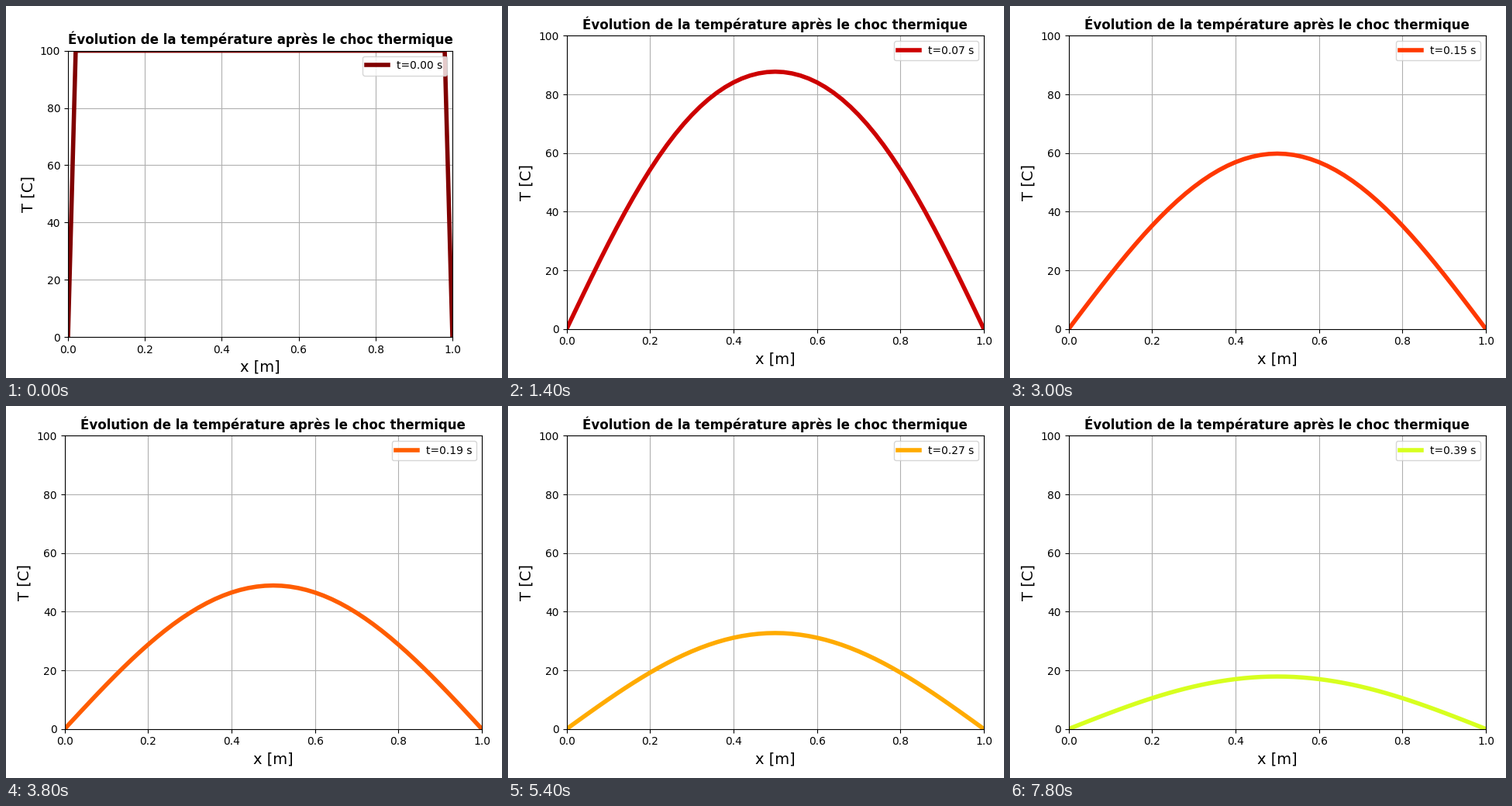
Animation of 640x480 px, one loop 8 s. Source, as a matplotlib script:

```python
import numpy as np
import matplotlib.pyplot as plt
from matplotlib.animation import FuncAnimation

FRAMES, INTERVAL = 40, 200
DT = 0.01            # simulated seconds per frame
DIFFUSIVITY = 0.51
T_START = 100.0
HEIGHT = 480         # stage height in pixels
TOP_GAP = 38.33      # pixels above the axes in the tight layout

x = np.linspace(0, 1, 51)
modes = np.arange(1, 100, 2)[:, None]


def temperature(t):
    """Heat equation on a rod whose two ends are held at zero."""
    if t == 0:
        temp = np.full_like(x, T_START)
    else:
        decay = np.exp(-DIFFUSIVITY * (modes * np.pi) ** 2 * t)
        waves = np.sin(modes * np.pi * x) / modes
        temp = 4 * T_START / np.pi * (decay * waves).sum(axis=0)
    temp[[0, -1]] = 0
    return temp


plt.rcParams["font.family"] = "DejaVu Sans"
fig, ax = plt.subplots(figsize=(6.4, HEIGHT / 100), dpi=100)
ax.set_title("Évolution de la température après le choc thermique",
             fontsize=12, fontweight="bold")
ax.set_xlabel("x [m]", fontsize=14)
ax.set_ylabel("T [C]", fontsize=14)
ax.set_xlim(0, 1)
ax.set_ylim(0, 100)
ax.grid(True)
line, = ax.plot(x, temperature(0), lw=4)


def margins():
    p = fig.subplotpars
    return dict(left=p.left, right=p.right, bottom=p.bottom, top=p.top)


# The opening frame has the default margins, all later ones the tight layout.
loose = margins()
fig.tight_layout()
tight = margins() | {"top": 1 - TOP_GAP / HEIGHT}


def draw(i):
    t = i * DT
    fig.subplots_adjust(**(tight if i else loose))
    line.set_ydata(temperature(t))
    line.set_color(plt.cm.jet(1 - t))
    ax.legend([line], [f"t={t:.2f} s"], loc="upper right")
    return [line]


anim = FuncAnimation(fig, draw, frames=FRAMES, interval=INTERVAL,
                     init_func=lambda: draw(0), repeat=True, repeat_delay=0)
plt.show()
```
